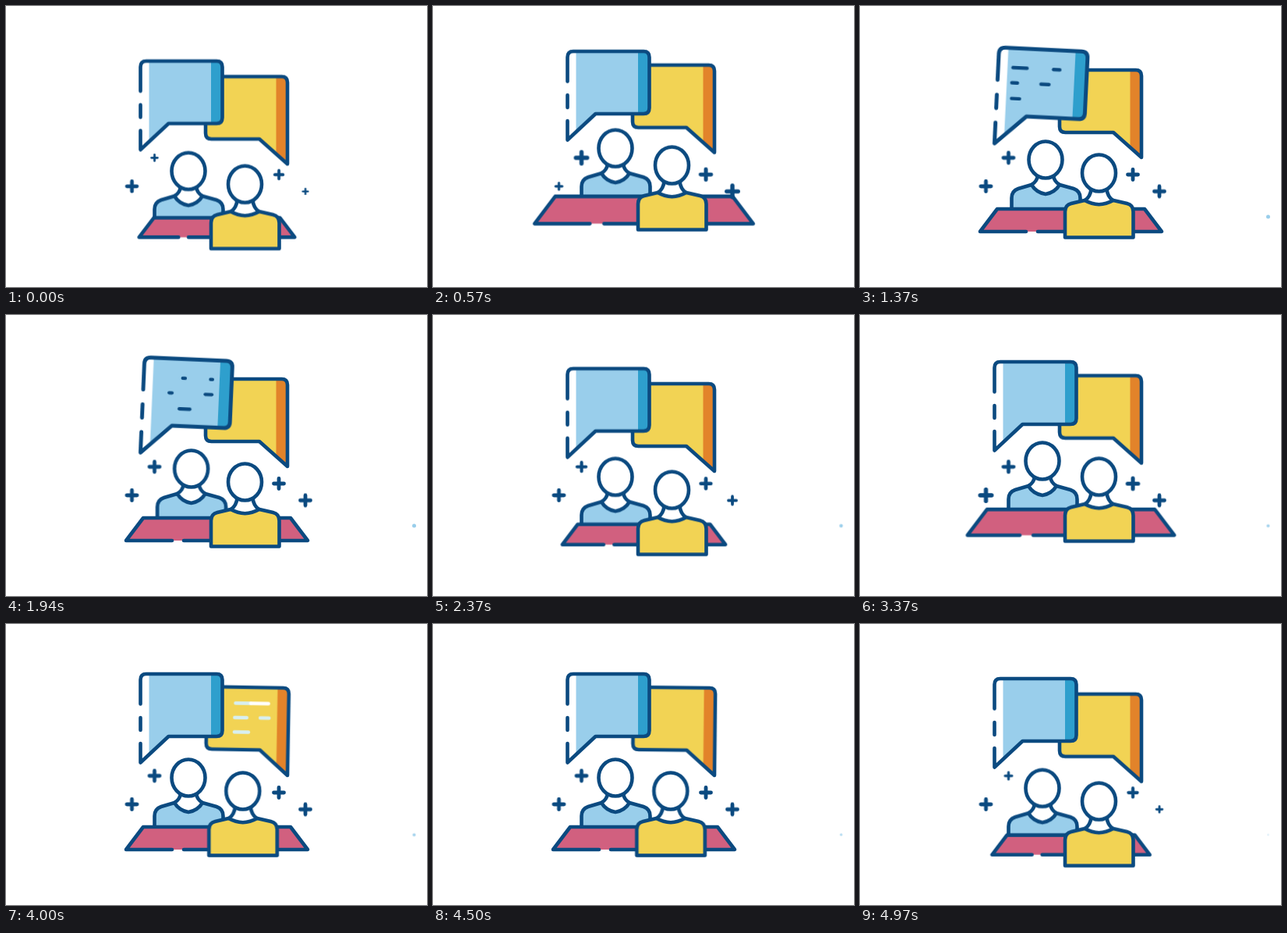
An HTML page for the animation above (5.01 s loop, 540 px wide and 360 px high).

```html
<!DOCTYPE html>
<html lang="en">
<head>
<meta charset="utf-8">
<title>Two people talking</title>
<style>
  html, body { margin: 0; width: 100%; height: 100%; overflow: hidden; background: #fff; }
  svg { display: block; width: 540px; height: 360px; }

  :root {
    --navy: #0b4a80; --sky: #99ceeb; --blue: #2e9fcd;
    --yellow: #f2d354; --orange: #e2832a; --pink: #d1607f;
    --sine: cubic-bezier(.37, 0, .63, 1);
  }
  .ink { stroke: var(--navy); stroke-width: 4.6; stroke-linecap: round; stroke-linejoin: round; fill: none; }
  .skin { fill: #fff; }

  /* squash down, spring up, settle: twice per loop */
  .bob { animation: bob 5010ms var(--sine) -4900ms infinite; }
  @keyframes bob {
    0%, 49.6%, 100% { transform: translateY(var(--lo)); }
    10%, 61.4% { transform: translateY(var(--hi)); }
    19.4%, 38.6%, 70.7%, 89% { transform: none; }
  }

  .table {
    fill: var(--pink);
    transform-origin: 270.5px 274.5px;
    animation: table 5010ms var(--sine) -4900ms infinite;
  }
  .table * { vector-effect: non-scaling-stroke; }
  @keyframes table {
    0%, 49.6%, 100% {
      transform: translateY(10.2px) scale(.842);
      animation-timing-function: cubic-bezier(.58, 0, .62, 1);
    }
    10%, 61.4% { transform: translateY(-13.5px) scale(1.21); }
    19.4%, 38.6%, 70.7%, 89% { transform: translateY(0) scale(1); }
  }

  /* speaker leans while the bubble tilts */
  .talk { animation: talk 5010ms var(--sine) -5010ms infinite; }
  .right .talk { animation-delay: -2510ms; }
  @keyframes talk {
    0%, 21.4%, 43.3%, 100% { transform: translate(0, 0) rotate(0) scale(1); }
    26%, 37.5% { transform: translate(var(--dx, 0px), var(--dy, 0px)) rotate(var(--tilt, 0deg)) scale(var(--grow, 1)); }
  }

  .line {
    fill: none; stroke: var(--navy); stroke-width: 4; stroke-linecap: round;
    stroke-dasharray: 1 2; stroke-dashoffset: 1.02;
    animation: write 5010ms var(--sine) calc(var(--i) * 20ms - 5010ms) infinite;
  }
  .right .line { stroke: #d8eff0; stroke-width: 4.6; animation-delay: calc(var(--i) * 20ms - 2660ms); }
  .right .white { stroke: #fff; }
  @keyframes write {
    0%, 22.7% { stroke-dashoffset: 1.02; }
    31.7% { stroke-dashoffset: 0; }
    40.7%, 100% { stroke-dashoffset: -1.02; }
  }

  .plus { animation: twinkle 2505ms var(--sine) var(--at) infinite; }
  @keyframes twinkle {
    0%, 100% { transform: scale(var(--min, .4)); }
    17% { transform: scale(1.12); }
    30%, 82% { transform: scale(1); }
  }

  .speck { fill: var(--sky); transform-origin: 523.5px 270px; animation: speck 5010ms linear infinite; }
  @keyframes speck {
    0%, 12% { transform: scale(0); opacity: 0; }
    20%, 40% { transform: scale(1); opacity: 1; }
    56%, 80% { transform: scale(.8); opacity: .9; }
    99% { transform: scale(.6); opacity: .5; }
    100% { transform: scale(0); opacity: 0; }
  }
</style>
</head>
<body>
<svg viewBox="0 0 540 360" width="540" height="360" role="img" aria-label="Two people talking at a table">
  <defs>
    <clipPath id="skyClip">
      <path d="M180 64H270Q277.5 64 277.5 71.5V136.5Q277.5 144 270 144H208.5L172.5 177.5V71.5Q172.5 64 180 64Z"/>
    </clipPath>
    <clipPath id="sunClip">
      <path id="sunShape" d="M263.5 82H353.5Q361 82 361 89.5V194L325 162H263.5Q256 162 256 154.5V89.5Q256 82 263.5 82Z"/>
    </clipPath>
    <path id="cross" class="ink" d="M-6.5 0H6.5M0-6.5V6.5" style="stroke-width:4.8"/>
  </defs>

  <!-- right bubble -->
  <g class="right">
    <g class="bob" style="--lo:9.3px;--hi:-6.6px">
      <g class="talk" style="--tilt:1deg;transform-origin:361px 194px">
        <g clip-path="url(#sunClip)">
          <rect x="250" y="78" width="115" height="120" fill="var(--yellow)"/>
          <rect x="346.5" y="78" width="20" height="120" fill="var(--orange)"/>
        </g>
        <use href="#sunShape" class="ink"/>
        <path class="line" pathLength="1" style="--i:0" d="M292 102.5H312"/>
        <path class="line white" pathLength="1" style="--i:1" d="M312 102.5H335"/>
        <path class="line" pathLength="1" style="--i:2" d="M292 121H307.5"/>
        <path class="line" pathLength="1" style="--i:3" d="M325 121H336"/>
        <path class="line" pathLength="1" style="--i:4" d="M292 139.5H310"/>
      </g>
    </g>
  </g>

  <!-- left bubble -->
  <g class="bob" style="--lo:7.2px;--hi:-6.1px">
    <g class="talk" style="--tilt:2.8deg;--grow:1.085;--dy:-1.5px;transform-origin:172.5px 177.5px">
      <g clip-path="url(#skyClip)">
        <rect x="170" y="60" width="14" height="120" fill="#fff"/>
        <rect x="183.5" y="60" width="80" height="120" fill="var(--sky)"/>
        <rect x="263" y="60" width="18" height="90" fill="var(--blue)"/>
      </g>
      <path class="ink" d="M172.5 102.5V71.5Q172.5 64 180 64H270Q277.5 64 277.5 71.5V136.5Q277.5 144 270 144H208.5L172.5 177.5V153M172.5 136V120"/>
      <path class="line" pathLength="1" style="--i:0" d="M190 87H222"/>
      <path class="line" pathLength="1" style="--i:1" d="M238 87H254.5"/>
      <path class="line" pathLength="1" style="--i:2" d="M189.5 105H207"/>
      <path class="line" pathLength="1" style="--i:3" d="M224 105H254.5"/>
      <path class="line" pathLength="1" style="--i:4" d="M190 123.5H229"/>
    </g>
  </g>

  <!-- left person -->
  <g class="bob" style="--lo:16px;--hi:-15.2px">
    <g class="talk" style="--dx:4px">
      <path class="ink" style="fill:var(--sky)" d="M190.5 263V246Q190.5 237 199 234L216 229H252L270 234Q278.5 237 278.5 246V263"/>
      <path class="ink skin" d="M224 217Q223 225 216 229Q222 239 234 241Q246 239 252 229Q245 225 244 217"/>
      <ellipse class="ink skin" cx="234" cy="197" rx="21.5" ry="23.5"/>
    </g>
  </g>

  <g class="table">
    <path d="M176 260H365L387 289H154Z"/>
    <path class="ink" d="M213 289H154L176 260H365L387 289H228"/>
  </g>

  <!-- right person -->
  <g class="right">
    <g class="bob" style="--lo:15.8px;--hi:-10.3px">
      <g class="talk" style="--dx:-2.7px">
        <path class="ink" style="fill:var(--yellow)" d="M263 296.5V263.5Q263 255 271 253L288 249H325L342.5 253Q350.5 255 350.5 263.5V296.5Z"/>
        <path class="ink skin" d="M296.5 234.5Q295.5 244.500 288.5 249Q297 254 306.500 254.200Q316 254 324.500 249Q317.500 244.500 316.500 234.500"/>
        <ellipse class="ink skin" cx="306.5" cy="214" rx="21.5" ry="23.5"/>
      </g>
    </g>
  </g>

  <g transform="translate(190.5 194.5)"><use href="#cross" class="plus" style="--at:-2330ms"/></g>
  <g transform="translate(161.5 231)"><use href="#cross" class="plus" style="--at:-2105ms"/></g>
  <g transform="translate(350 216)"><use href="#cross" class="plus" style="--at:-2255ms;--min:.53"/></g>
  <g transform="translate(384 237.5)"><use href="#cross" class="plus" style="--at:-2375ms"/></g>

  <circle class="speck" cx="523.5" cy="270" r="2.5"/>
</svg>
</body>
</html>
```
